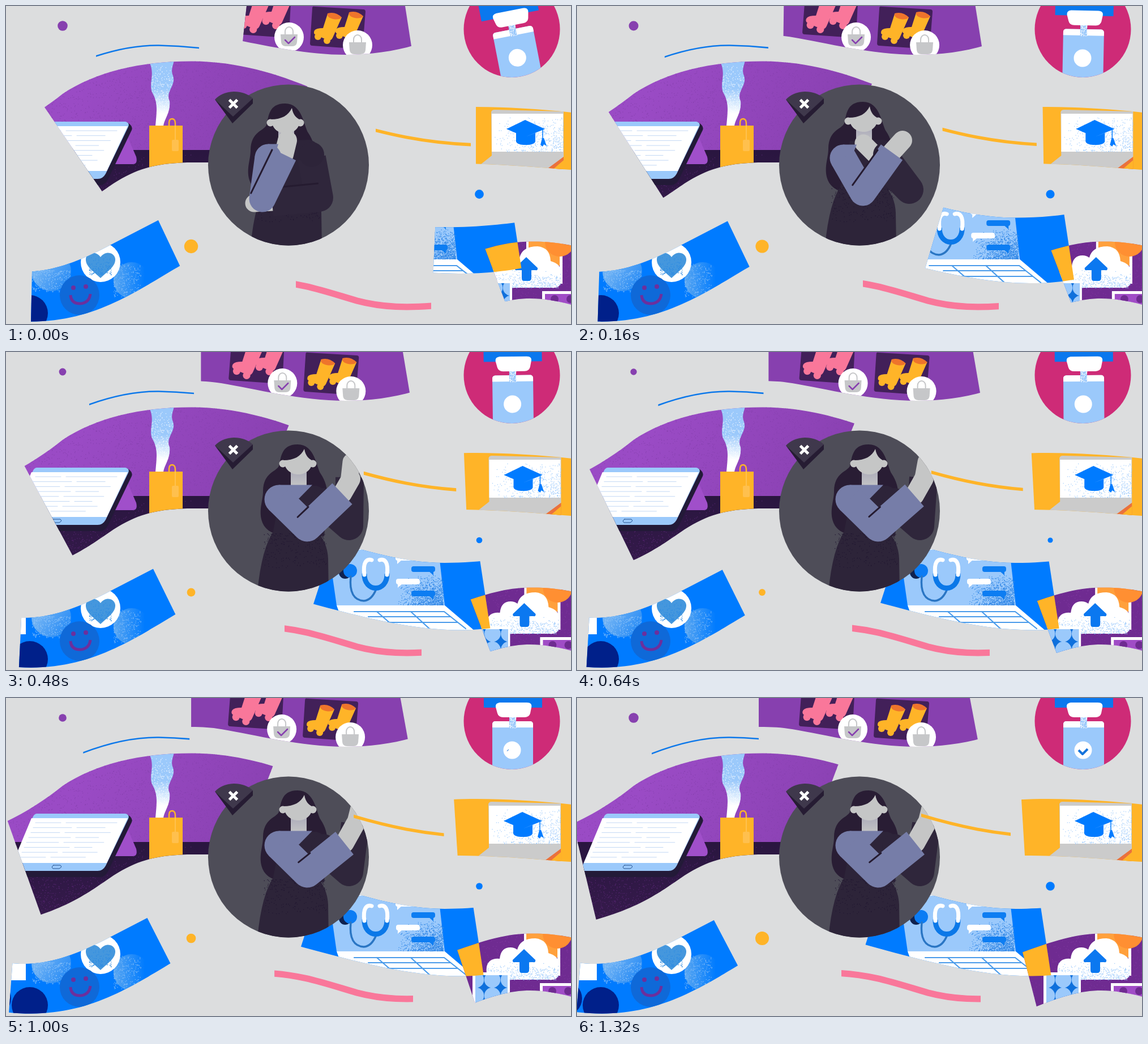
Recreate the animation shown at these times as an HTML page with a canvas. Size 998x561 px, loop 1.36 s.

```html
<!DOCTYPE html>
<html lang="en">
<head>
<meta charset="utf-8">
<style>
html, body { margin: 0; width: 100%; height: 100%; overflow: hidden; background: #dcddde; }
canvas { display: block; }
</style>
</head>
<body>
<canvas id="stage" width="998" height="561"></canvas>
<script>
const c = document.getElementById('stage').getContext('2d');
const LOOP = 1360, STEP = 40;
const BLUE = '#007bff', SKY = '#9bc9fb', GOLD = '#ffb428', PINK = '#f9779a', PURPLE = '#8740af';
const PLUM = '#6f2b91', INK = '#2d2439', SKIN = '#c5c6c6', SLEEVE = '#767da8', WHITE = '#fff';
let t = 0;

// Motion
const mix = (a, b, k) => a.map((v, i) => v + (b[i] - v) * k);
const slide = (from, to, power = 1.4) => mix(to, from, (1 - t / (LOOP - STEP)) ** power);
const settle = power => Math.max(0, 1 - t / 340) ** power;
const glide = distance => distance * Math.exp(-t / 210);
function pose(start, middle, end) {
  const u = Math.min(1, t / 320), bend = mix(mix(start, end, .5), middle, 2);
  return mix(mix(start, bend, u), mix(bend, end, u), u);
}

// Drawing
const path = d => typeof d === 'string' ? new Path2D(d) : d;
function fill(d, color) { c.fillStyle = color; c.fill(path(d)); }
function line(d, color, width, cap = 'round') {
  c.strokeStyle = color; c.lineWidth = width; c.lineCap = cap; c.lineJoin = 'round';
  c.stroke(path(d));
}
function rect(x, y, w, h, color, r = 0) { const p = new Path2D(); p.roundRect(x, y, w, h, r); fill(p, color); }
function circle(x, y, r, color) { const p = new Path2D(); p.arc(x, y, r, 0, 7); fill(p, color); }
function fade(x0, y0, x1, y1, from, to) {
  const g = c.createLinearGradient(x0, y0, x1, y1);
  g.addColorStop(0, from); g.addColorStop(1, to);
  return g;
}
function within(shape, draw, dx = 0) {
  c.save(); c.clip(path(shape)); c.translate(dx, 0); draw(); c.restore();
}
// Area between two slanted sides, each running well past its end points
function slab(leftTop, leftBottom, rightTop, rightBottom) {
  const corners = [mix(leftBottom, leftTop, 1.5), mix(rightBottom, rightTop, 1.5),
    mix(rightTop, rightBottom, 1.5), mix(leftTop, leftBottom, 1.5)];
  return new Path2D('M' + corners.join('L') + 'Z');
}

let seed = 7;
const random = () => (seed = seed * 16807 % 2147483647) / 2147483647;
// Speckles; powers below 1 crowd them to the far side
function grain(n, x, y, w, h, px = 1, py = 1) {
  const p = new Path2D();
  while (n--) p.rect(x + w * random() ** px, y + h * random() ** py, 1.2, 1.2);
  return p;
}
const specks = {
  wall: grain(2600, 0, 97, 540, 157, .8), floor: grain(1300, 20, 256, 340, 130, 1, .5),
  steam: grain(420, 252, 105, 48, 85, 1, .6), screen: grain(1000, 690, 392, 82, 55, .5, .5),
  lid: grain(420, 853, 192, 126, 65, .5, .5), cloud: grain(420, 850, 465, 125, 32, 1, .5),
  purple: grain(500, 800, 415, 198, 130), neck: grain(60, 889, 33, 12, 20),
  leftDot: grain(260, 46, 466, 68, 38, 1, 1.6), rightDot: grain(260, 190, 455, 48, 58, 1.6),
  heart: grain(160, 146, 438, 40, 36, 1, .6), skirt: grain(260, 455, 320, 110, 60, 1, 1.6)
};

const band = {
  room: path('M-40 234C10 218 60 187 100 155C160 115 240 97 330 97.5C410 98 480 120 540 145L480 276H320C260 278 230 288 190 313C140 347 100 379 -20 404Z'),
  shop: path('M300 -2H740V63C700 78 650 86 600 86C520 86 440 65 380 55C355 51 340 51 300 51Z'),
  classroom: path('M770 180C840 175 930 180 1010 189V290C930 284 860 277 770 278Z'),
  chat: path('M-10 465C50 476 100 464 170 429L290 367L320 451C220 508 140 573 -10 553Z'),
  desk: path('M490 310C600 337 680 372 775 372C850 372 900 360 940 352V468C900 482 850 491 800 490.5C710 490 620 466 490 430Z'),
  cloud: path('M760 458C820 437 870 416 925 415.5C955 415 980 418 1010 425V530C960 516 920 510 870 524C840 532 820 541 790 553Z')
};

function room() {
  fill('M-40 90H560V260H-40Z', fade(150, 110, 430, 260, '#9a4bc5', '#8a41b2'));
  fill(specks.wall, PURPLE);
  fill('M-40 254H500V410H-40Z', fade(0, 260, 0, 380, '#2a1640', '#351a4b'));
  fill(specks.floor, '#54246f');
  fill('M214 229L230 266Q233 279 224 279H190Z', '#a04fca');
  fill('M214 205Q225 212 222 219L180 306Q175 316 165 316H16L10 300Z', '#231a38');
  fill('M54 204H211Q219 206 216 213L176 296Q171 305 162 305H14Q8 304 10 295L47 211Q49 205 54 204Z', SKY);
  fill('M45 212H215L178 291H12Z', WHITE);
  for (let i = 0; i < 8; i++) {
    const y = 220 + i * 8.7, x = 52 - i * 4;
    line(`M${x} ${y}h${45 + i * 23 % 40}m9 0H${196 - i * 3.8 - i * 17 % 30}`, '#c3d8f4', 1);
  }
  line('M84 295H96Q100 298 94 301H83Q79 298 84 295Z', '#24538f', 1);
  const steam = path('M251 95C266 120 250 137 259 154C269 171 266 188 264 211H278C280 199 291 187 289 168C281 150 301 141 295 123C290 112 296 104 297 95Z');
  fill(steam, fade(0, 145, 0, 190, SKY, WHITE));
  within(steam, () => fill(specks.steam, 'rgba(255,255,255,.75)'));
  rect(253, 211, 59, 80, GOLD);
  line('M288 214V206Q288 199 294 199Q299 200 299 207V238', GOLD, 2.5);
  line('M299 211V238', '#ffc65c', 1.5);
  rect(293, 236, 12, 20, '#ffc04e', 2);
}

function boot(x, y, size, color, lining) {
  c.save(); c.translate(x, y); c.scale(size, size);
  fill('M-12 -4L13 2L-3 38Q-6 44 -12 42L-33 33Q-38 30 -35 25Q-32 21 -20 21Z', color);
  fill('M-12 -5Q2 -9 13 2Q9 7 -2 5Q-14 2 -12 -5Z', lining);
  circle(-29, 36, 6, color); circle(-13, 43, 6, color);
  c.restore();
}
function bag(x, y) {
  circle(x, y, 26, WHITE);
  line(`M${x - 7} ${y - 4}V${y - 10}a7 8 0 0 1 14 0V${y - 4}`, '#c6c7c9', 2);
  fill(`M${x - 15} ${y - 5}h30l-1 14q-1 7 -8 7h-12q-7 0 -8 -7z`, '#c6c7c9');
}
function shop() {
  fill('M280 -2H750V95H280Z', PURPLE);
  fill('M396 -5H490L487 51Q487 56 483 56L396 50Q392 50 392 46Z', '#422059');
  fill('M532 1L618 6Q622 6 622 10L617 72Q617 76 613 76L528 70Q524 70 524 66L528 4Q528 0 532 1Z', '#422059');
  for (const i of [0, 1]) {
    boot(438 + 40 * i, -6 - 7 * i, 1.1, PINK, '#e8577e');
    boot(567 + 38 * i, 18 - 2 * i, 1, GOLD, '#ee742c');
  }
  bag(487, 55); bag(608, 69);
  line('M480 60L486 66L497 55', PURPLE, 2.5);
}

function robot() {
  const swing = glide(-11) ** 1 * Math.cos(2 * Math.PI * t / 560), frame = new Path2D();
  frame.arc(893.5, 41, 85, 0, 7);
  fill(frame, '#ce2b77');
  within(frame, () => {
    c.translate(895, 43); c.rotate(swing * Math.PI / 180); c.translate(-895, -43);
    rect(844, -40, 103, 57, '#0a78ee');
    rect(889, 30, 12, 24, SKY);
    fill('M872 8H920Q930 8 928 17L926 27Q924 34 916 34H878Q870 34 868 27L865 16Q864 9 872 8Z', WHITE);
    rect(859, 41, 72, 100, SKY, 5);
    rect(859, 41, 72, 11, WHITE, [5, 5, 0, 0]);
    rect(889, 34, 12, 20, SKY);
    fill(specks.neck, WHITE);
    circle(894, 92, 15.5, WHITE);
    const drawn = Math.min(1, (t - 990) / 260);
    if (drawn > 0) {
      c.setLineDash([23 * drawn, 40]);
      line('M886 92L893 99L902 90', '#1674dc', 4, 'butt');
      c.setLineDash([]);
    }
  });
}

function classroom() {
  fill('M760 170H1010V295H760Z', GOLD);
  fill('M852 187Q853 183 858 183L980 186V266L953 287L834 279L853 264Z', '#cbcbcb');
  fill('M853 190H979V257H853Z', WHITE);
  fill(specks.lid, SKY);
  fill('M980 266V290L950 288Z', '#ea713c');
  fill('M966 284L980 272V289H960Z', GOLD);
  fill('M879 217L912 201L947 217L912 231ZM896 224L912 231L930 224V239Q928 245 913 245Q898 245 896 239Z', BLUE);
  line('M943 218V238', BLUE, 1.5);
  fill('M942 233H945L950 247L945 244L943 248L939 245Z', BLUE);
}

function chat() {
  fill('M-20 360H330V570H-20Z', BLUE);
  rect(-20, 460, 55, 38, WHITE);
  circle(80, 468, 35, fade(55, 470, 100, 500, '#6fb2f4', '#2b8df5'));
  fill(specks.leftDot, '#8ec3f8');
  circle(222, 484, 32, fade(190, 0, 245, 0, '#59a6f0', BLUE));
  fill(specks.rightDot, '#7db9f7');
  circle(167, 452, 35, WHITE);
  fill('M167 480C156 469 140 460 141 446C143 433 160 432 167 443C174 432 191 433 193 446C194 460 178 469 167 480Z', '#4597dd');
  fill(specks.heart, '#2d8be2');
  circle(130, 510, 35, '#0f69d8');
  circle(119, 497, 4, '#6c2f9d'); circle(141, 495, 4, '#6c2f9d');
  line('M114 510Q115 525 131 525Q147 524 149 508', '#6c2f9d', 5, 'butt');
  circle(42, 542, 32, '#00208a'); circle(-21, 530, 30, '#00208a');
}

function bubble(x, y, color, tail) {
  rect(x, y, 42, 10, color, 4);
  fill(`M${x + 21 + 9 * tail} ${y + 8}h${9 * tail}v8z`, color);
}
function desk() {
  fill('M470 300H960V500H470Z', BLUE);
  fill('M570 300H760L764 349H570Z', WHITE);
  fill('M570 349H764L775 447H584Z', SKY);
  fill(specks.screen, '#2f86e6');
  fill('M584 447H775L828 492H600Z', WHITE);
  line('M615 458H774L812 488M640 467H785M668 477H798M655 458L692 490M715 458L750 490', '#4a9bea', 2.2);
  bubble(688, 358, WHITE, -1); bubble(716, 378, '#0d7df2', 1);
  bubble(689, 400, WHITE, -1); bubble(716, 421, '#0d7df2', 1);
  circle(599, 389, 11, '#10224f'); circle(608, 386, 12, '#0b7cf4');
  line('M609 396C606 425 615 438 632 439Q646 438 654 418', '#2a76c4', 3.5);
  line('M633 391C632 425 674 425 673 391', '#0b78e8', 9, 'butt');
  line('M633 393C630 371 637 364 646 367M673 393C676 371 669 364 660 367', WHITE, 7);
}

function cloud() {
  fill('M750 400H1010V570H750Z', PLUM);
  fill(specks.purple, '#7f379f');
  rect(915, 400, 64, 90, WHITE);
  rect(919, 400, 55, 58, '#ffa03c');
  circle(974, 416, 26, '#ff8f32');
  rect(919, 458, 55, 32, PLUM);
  fill('M862 497Q846 495 849 474Q853 458 872 460Q874 440 891 440Q898 440 903 444Q908 424 935 424Q957 426 958 450Q976 455 976 468V486Q975 497 964 497Z', WHITE);
  fill(specks.cloud, SKY);
  fill('M915 443L935 462Q936 467 931 466H924V480Q924 485 919 485H911Q907 485 907 480V466H899Q894 467 895 462Z', '#0b78f0');
  rect(824, 484, 66, 80, WHITE);
  const tile = path('M829 489H886V560H829Z');
  fill(tile, '#0f70dc');
  within(tile, () => {
    for (let i = 0; i < 9; i++) circle(830 + 29 * (i % 3), 497 + 28 * (i / 3 | 0), 14.3, SKY);
  });
  rect(943, 503, 80, 60, WHITE);
  rect(948, 508, 80, 60, '#a04cc6');
  circle(965, 517, 7, PLUM); circle(993, 517, 7, PLUM);
}

function limb(points, width, color, cap) { line('M' + points.join('L'), color, width, cap); }
// Dark seam along one side of a forearm
function seam([ex, ey], [wx, wy], offset, length) {
  const l = Math.hypot(wx - ex, wy - ey), dx = (wx - ex) / l, dy = (wy - ey) / l;
  const x = ex + dy * offset, y = ey - dx * offset;
  limb([[x, y], [x + dx * length, y + dy * length]], 3, '#251b30');
}
function shifted([x, y], draw) { c.save(); c.translate(x, y); draw(); c.restore(); }

function woman() {
  const late = Math.min(1, Math.max(0, (t - 480) / 320));
  const head = pose([-23, 9], [-11, 6], [-1, 0]), hips = pose([-12, 0], [-6, 0], [0, 0]);
  const shoulder = pose([463, 267], [470, 268], [482, 260]), elbow = pose([453, 340], [505, 329], [532, 309]);
  const wrist = mix(pose([491, 262], [556, 258], [594, 250]), [598, 256], late);
  const palm = mix(pose([497, 237], [575, 237], [609, 224]), [617, 222], late);
  const backShoulder = pose([540, 268], [545, 268], [561, 268]), backElbow = pose([553, 338], [587, 324], [606, 307]);
  const backWrist = mix(pose([470, 346], [530, 266], [607, 221]), [617, 222], late);
  const backPalm = mix(pose([438, 348], [506, 242], [610, 194]), [624, 194], late);
  const [width, chest, seamLength] = pose([47, 18, 85], [47, 24, 76], [51, 59, 26]);

  shifted(head, () => fill('M516 163C486 163 487 188 483 201C478 212 456 212 455 245C455 262 448 275 452 295C456 312 470 322 490 322L555 305C574 275 573 238 557 215C549 203 547 163 516 163Z', '#291d34'));
  shifted(hips, () => {
    fill('M488 238L548 236Q566 240 568 262L562 325H470Z', INK);
    fill('M474 314H548Q568 336 569 365L570 425H444Q451 346 474 314Z', INK);
    fill(specks.skirt, '#201630');
  });
  shifted(head, () => {
    fill('M504 208H532V238Q518 249 504 238Z', fade(0, 212, 0, 238, '#aeadbb', SKIN));
    circle(490, 197, 6.5, SKIN); circle(543, 197, 6.5, SKIN);
    fill('M528 171C522 184 510 191 491 191C493 208 505 216 517 216C530 216 541 208 543 192C535 188 530 183 528 171Z', SKIN);
  });

  limb([backWrist, backPalm], 31, SKIN);
  limb([backShoulder, backElbow, backWrist], 50, '#2f263b', 'butt');
  if (t < 120) seam(backElbow, backWrist, -25, 64);
  circle(backShoulder[0], 262, 22, INK);
  limb([wrist, palm], 34, SKIN);
  const [x, y] = shoulder, r = width / 2;
  circle(x, y, r, SLEEVE);
  fill(`M${x} ${y - r}h${chest}l${-chest * .4} 24H${x}Z`, SLEEVE);
  limb([shoulder, elbow, wrist], width, SLEEVE, 'butt');
  seam(elbow, wrist, r - 1, seamLength);
}

function strand(d, [from, to], color, width) {
  const span = new Path2D();
  span.rect(from, 0, to - from, 561);
  within(span, () => line(d, color, width, 'butt'));
}

function draw() {
  c.fillStyle = '#dcddde';
  c.fillRect(0, 0, 998, 561);
  const beat = Math.cos(2 * Math.PI * (t - 25) / LOOP);
  circle(100, 35, 7.2 + 1.6 * beat, PURPLE);
  circle(836, 332, 6.2 + 1.7 * beat, BLUE);
  circle(327, 424, 9 + 3.2 * beat, GOLD);

  within(slab(slide([69, 180], [-8, 217], 1.5), slide([169, 326], [34, 392], 1.15), slide([532, 143], [462, 116]),
    slide([472, 276], [402, 276])), () => within(band.room, room));
  const pull = glide(.5) + settle(4) * 49;
  within(slab(mix(slide([365, 0], [321, 0]), [377, 0], settle(4) * 5), mix(slide([365, 55], [321, 52]), [375, 62], settle(4) * 5),
    slide([705, 0], [694, 0], 1), slide([716, 71], [708, 74], 1)), () => within(band.shop, shop, glide(13)));
  robot();
  within(slab(slide([830, 178], [785, 179]), slide([830, 278], [791, 278], 1.25), [1000, 178], [1000, 278]),
    () => within(band.classroom, classroom, glide(5)));
  within(slab(slide([46, 467], [6, 467]), slide([44, 558], [-1, 553]), slide([269, 378], [242, 392], .9),
    slide([307, 458], [283, 470], .9)), () => within(band.chat, chat));

  const far = settle(1.75), squeeze = settle(4);
  const [deskLeft, deskRight] = mix(slide([568, 849], [508, 819], 1.1), slide([756, 896], [696, 866], 1.1), far);
  const deskSlab = slab([deskLeft + 29 - 25 * squeeze, 350], [deskLeft, 440], [deskRight, 368], [deskRight + 17, 480]);
  const deskBand = new Path2D();
  deskBand.addPath(band.desk, new DOMMatrix().translate(0, 431).scale(1, 1 - .31 * squeeze).translate(0, -431));
  const cloudSlab = slab(slide([847, 430], [787, 448], 1.25), slide([881, 520], [812, 545], 1), [1000, 420], [1000, 530]);
  within(deskSlab, () => within(deskBand, desk, 22 * far));
  within(cloudSlab, () => within(band.cloud, () => {
    c.save(); c.translate(glide(4), 0); cloud(); c.restore();
    within(deskSlab, () => fill(deskBand, GOLD));
  }));

  const disc = new Path2D();
  disc.arc(499, 280.5, 142, 0, 7);
  fill(disc, '#4e4d58');
  within(disc, woman);
  fill('M369 165L400 207L436 172V163L400 180Z', '#261c33');
  fill('M369 165Q381 152 402 151Q423 151 436 163L401 195Z', '#3f384c');
  line('M394.5 165.5L408.5 179.5M408.5 165.5L394.5 179.5', WHITE, 5, 'butt');

  strand('M120 103C180 78 230 69 270 69.5C300 70 325 72 350 75', slide([159, 341], [132, 321], 1.3), '#0d78ea', 2.6);
  strand('M595 203C670 226 740 242 830 245', slide([653, 821], [608, 766]), GOLD, 5.6);
  strand('M455 485C520 487 565 504 620 520C665 532 710 533 765 528', slide([512, 751], [467, 713], 1.3), PINK, 11.3);
}

function tick() {
  t = Math.floor(performance.now() % LOOP / STEP) * STEP;
  draw();
  requestAnimationFrame(tick);
}
tick();
</script>
</body>
</html>
```
